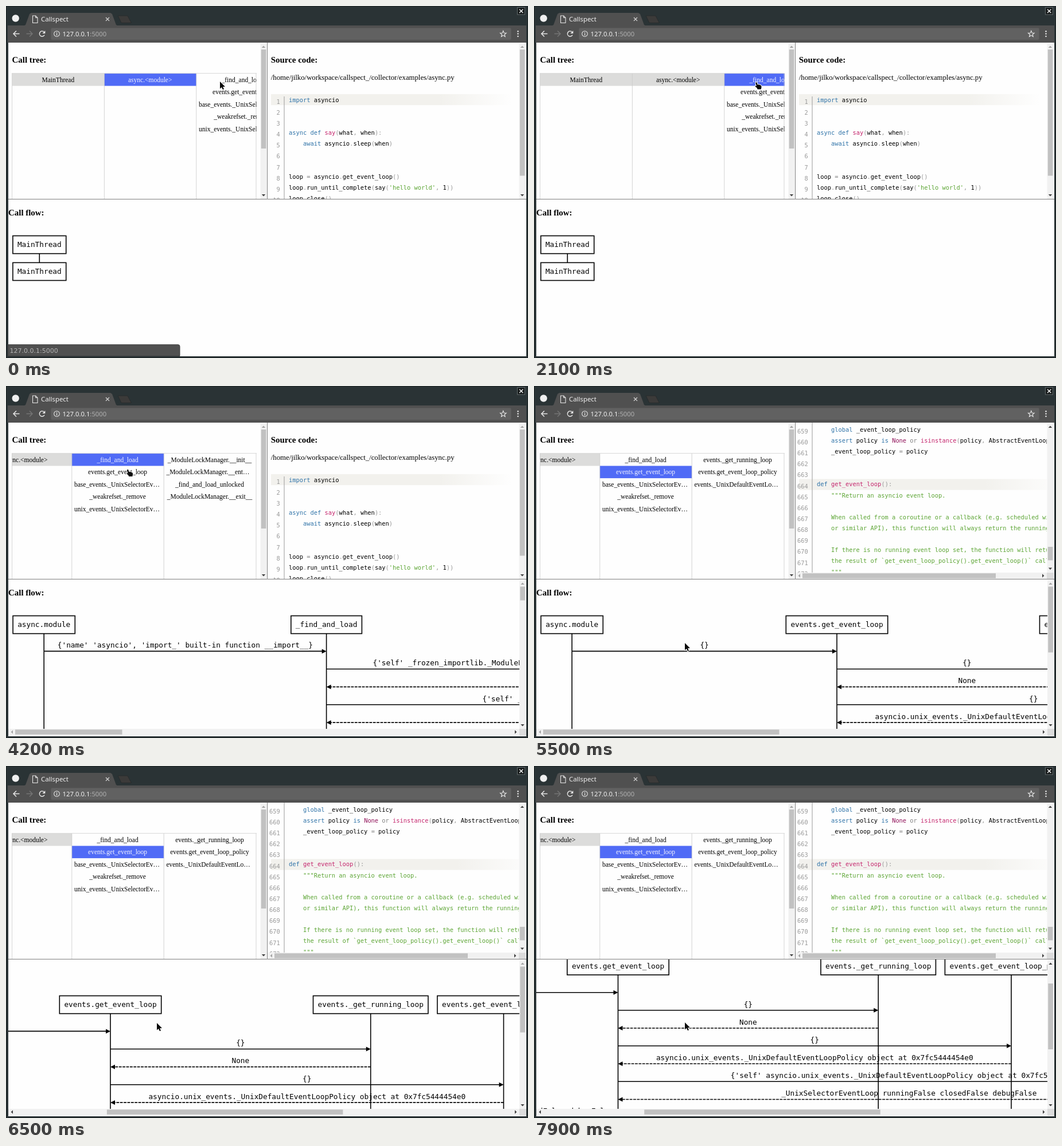
These frames come from a looping animation (910 px wide and 615 px high, 8 s). An HTML page with a canvas:

```html
<!DOCTYPE html>
<html lang="en">
<head>
<meta charset="utf-8">
<title>Callspect</title>
<style>
html, body { margin: 0; width: 100%; height: 100%; overflow: hidden; background: #2a3335; }
canvas { display: block; }
</style>
</head>
<body>
<canvas id="stage" width="910" height="615"></canvas>
<script>
const ctx = document.getElementById('stage').getContext('2d');
const LOOP = 8000, STEP = 100;
const SERIF = '"Liberation Serif", Times, serif';
const MONO = '"DejaVu Sans Mono", monospace';
const SANS = '"Noto Sans", "Open Sans", sans-serif';

// the page is shown at this zoom
const ZOOM = 0.798;
const font = (px, family, weight = '') => `${weight} ${px * ZOOM}px ${family}`;
const HEAD = font(18.72, SERIF, 'bold'), BODY = font(16, SERIF), CELL = font(14.4, SERIF);
const CODE = font(13, MONO), FLOW = font(16, MONO);
const CODE_W = 13 * 0.602 * ZOOM, FLOW_W = 16 * 0.602 * ZOOM, LINE_H = 24 * ZOOM;

// moments of the interaction
const HAND = 200, BUBBLE = 400, PICK_1 = 500, LOAD_1 = 2800, PICK_2 = 4400, LOAD_2 = 4700, ARROW = 4900;

const clamp = v => Math.max(0, Math.min(1, v));
const swing = p => 0.5 - Math.cos(Math.PI * clamp(p)) / 2;

// value at time t from [time, value] stops; a third entry asks for easing
function track(t, stops) {
  let [t0, v0] = stops[0];
  for (const [t1, v1, ease] of stops) {
    if (t < t1) {
      const p = clamp((t - t0) / (t1 - t0));
      return v0 + (v1 - v0) * (ease ? swing(p) : p);
    }
    t0 = t1; v0 = v1;
  }
  return v0;
}

function rect(x, y, w, h, fill) {
  ctx.fillStyle = fill;
  ctx.fillRect(x, y, w, h);
}

function text(s, x, y, face, fill = '#000', align = 'left') {
  ctx.font = face;
  ctx.fillStyle = fill;
  ctx.textAlign = align;
  ctx.fillText(s, x, y);
}

function path(points, fill, stroke, width = 1, close = true) {
  ctx.beginPath();
  points.forEach(([x, y]) => ctx.lineTo(x, y));
  if (close) ctx.closePath();
  if (fill) { ctx.fillStyle = fill; ctx.fill(); }
  if (stroke) { ctx.strokeStyle = stroke; ctx.lineWidth = width; ctx.stroke(); }
}

const line = (x0, y0, x1, y1, color, width = 1) => path([[x0, y0], [x1, y1]], null, color, width, false);

function circle(x, y, r, fill, stroke, width = 1) {
  ctx.beginPath();
  ctx.arc(x, y, r, 0, 7);
  if (fill) { ctx.fillStyle = fill; ctx.fill(); }
  if (stroke) { ctx.strokeStyle = stroke; ctx.lineWidth = width; ctx.stroke(); }
}

function panel(x, y, w, h, radius, fill, stroke) {
  ctx.beginPath();
  ctx.roundRect(x, y, w, h, radius);
  ctx.fillStyle = fill;
  ctx.fill();
  ctx.strokeStyle = stroke;
  ctx.lineWidth = 1;
  ctx.stroke();
}

function clipped(x, y, w, h, draw) {
  ctx.save();
  ctx.beginPath();
  ctx.rect(x, y, w, h);
  ctx.clip();
  draw();
  ctx.restore();
}

const arrowColor = on => on ? '#404040' : '#a3a3a3';

function vbar(x, top, bottom, from, to, up, down) {
  const c = x + 5.5;
  rect(x, top, 11, bottom - top, '#f1f1f1');
  rect(x + 1.3, from, 8.6, to - from, '#c1c1c1');
  path([[c - 3.2, top + 8], [c + 3.2, top + 8], [c, top + 4.6]], arrowColor(up));
  path([[c - 3.2, bottom - 8], [c + 3.2, bottom - 8], [c, bottom - 4.6]], arrowColor(down));
}

function hbar(y, left, right, from, to, back, fwd) {
  const c = y + 5.5;
  rect(left, y, right - left, 11, '#f1f1f1');
  rect(from, y + 1.3, to - from, 8.6, '#c1c1c1');
  path([[left + 8, c - 3.2], [left + 8, c + 3.2], [left + 4.6, c]], arrowColor(back));
  path([[right - 8, c - 3.2], [right - 8, c + 3.2], [right - 4.6, c]], arrowColor(fwd));
}

// ---------- browser window ----------
function drawChrome() {
  rect(0, 0, 910, 615, '#2a3335');
  ctx.strokeStyle = '#1b2223';
  ctx.lineWidth = 1;
  ctx.strokeRect(0.5, 0.5, 909, 614);

  rect(3, 34, 904, 30, '#505050');
  path([[31, 34.5], [34, 33], [41, 14], [44, 12], [182, 12], [185, 14], [192, 33], [195, 34.5]], '#505050');
  path([[195, 17], [212, 17], [218.5, 29.5], [201, 29.5]], '#3b3a39', '#262b2c');
  circle(16.7, 21.5, 6.2, '#f0f0f0');

  path([[46.5, 17], [51.5, 17], [55, 20.5], [55, 29.5], [46.5, 29.5]], null, '#e6e6e6', 1.1);
  path([[51.5, 17], [51.5, 20.5], [55, 20.5]], null, '#e6e6e6', 1, false);
  text('Callspect', 61, 27, '11.4px ' + SANS, '#f0f0f0');
  line(174, 20, 180, 26, '#d0d0d0', 1.3);
  line(180, 20, 174, 26, '#d0d0d0', 1.3);

  rect(891, 2, 14, 13.5, '#141818');
  ctx.strokeStyle = '#586062';
  ctx.strokeRect(891.5, 2.5, 13, 12.5);
  line(895, 5.7, 901.3, 12, '#f4f4f4', 1.5);
  line(901.3, 5.7, 895, 12, '#f4f4f4', 1.5);

  for (const [x, dir, color] of [[18, 1, '#e8e8e8'], [41, -1, '#757575']]) {
    line(x - 5 * dir, 48.5, x + 5.5 * dir, 48.5, color, 1.5);
    path([[x, 43.5], [x - 5 * dir, 48.5], [x, 53.5]], null, color, 1.5, false);
  }
  ctx.beginPath();
  ctx.arc(63, 48.5, 4.6, 0.5, 5.4);
  ctx.strokeStyle = '#e8e8e8';
  ctx.lineWidth = 1.5;
  ctx.stroke();
  path([[68.3, 43], [68.3, 48], [63.3, 48]], '#e8e8e8');

  panel(78.5, 38.5, 802, 20.5, 2, '#616161', '#5a5a5a');
  circle(88.5, 48.5, 4.8, null, '#e4e4e4', 1.1);
  rect(87.9, 47.6, 1.3, 3.8, '#e4e4e4');
  rect(87.9, 45.4, 1.3, 1.3, '#e4e4e4');
  const urlFont = '11.3px ' + SANS;
  text('127.0.0.1', 98.5, 52.6, urlFont, '#f2f2f2');
  text(':5000', 98.5 + ctx.measureText('127.0.0.1').width, 52.6, urlFont, '#b0b0b0');

  const star = [...Array(10).keys()].map(i => {
    const r = i % 2 ? 2.4 : 5.6, a = i * Math.PI / 5;
    return [866.8 + r * Math.sin(a), 49 - r * Math.cos(a)];
  });
  path(star, null, '#e8e8e8', 1.1);
  [44.2, 48.6, 53].forEach(y => circle(892.5, y, 1.25, '#e8e8e8'));
}

// ---------- call tree ----------
const COL = 201 * ZOOM, ROW = 27 * ZOOM, TOP = 118;
const CALLS = ['_find_and_load', 'events.get_event_loop', 'base_events._UnixSelectorEv…',
  '_weakrefset._remove', 'unix_events._UnixSelectorEv…'];
const LOAD_CALLS = ['_ModuleLockManager.__init__', '_ModuleLockManager.__ent…',
  '_find_and_load_unlocked', '_ModuleLockManager.__exit__'];
const LOOP_CALLS = ['events._get_running_loop', 'events.get_event_loop_policy', 'events._UnixDefaultEventLo…'];

function drawTree(t) {
  text('Call tree:', 10.5, 99, HEAD);
  const columns = [['MainThread'], ['async.<module>'], CALLS];
  if (t >= LOAD_1) columns.push(t >= LOAD_2 ? LOOP_CALLS : LOAD_CALLS);
  const active = t < PICK_1 ? [1, 0] : [2, t < PICK_2 ? 0 : 1];
  const shift = t < LOAD_1 ? 0 : 217 * swing((t - 2681) / 400);

  clipped(10, TOP - 1, 427, 220, () => {
    columns.forEach((rows, c) => {
      const x = 11 + c * COL - shift;
      rows.forEach((name, r) => {
        const y = TOP + r * ROW, on = c === active[0] && r === active[1];
        if (on) rect(x, y, COL, ROW, '#506bf6');
        else if (c < active[0] && c < 2) rect(x, y, COL, ROW, '#dcdcdb');
        const fill = on ? '#f4f5ff' : '#000';
        if (name.endsWith('…')) text(name, x + 4.2, y + 14.6, CELL, fill);
        else text(name, x + COL / 2 - 0.4, y + 14.6, CELL, fill, 'center');
      });
      if (c) line(x, TOP, x, 337, '#c8c8c8', ZOOM);
    });
    line(10, 117.7, 437, 117.7, '#cccccc', ZOOM);
    line(10.5, 118, 10.5, 337, '#cccccc', ZOOM);
    line(436, 118, 436, 337, '#cccccc', ZOOM);
  });
  vbar(443.5, 65, 337, 76, 249, false, true);
}

// ---------- source code ----------
// first letter of each piece: k keyword, f function, s string, p punctuation, o operator, b constant, n plain
const INK = { k: '#2f73a8', f: '#c4246c', s: '#5ca534', p: '#999999', o: '#808080', b: '#8f1058', n: '#000000' };
const SMALL = [
  ['kimport', 'n asyncio'], [], [],
  ['kasync def ', 'fsay', 'p(', 'nwhat', 'p,', 'n when', 'p):'],
  ['k    await', 'n asyncio', 'p.', 'nsleep', 'p(', 'nwhen', 'p)'], [], [],
  ['nloop ', 'o=', 'n asyncio', 'p.', 'nget_event_loop', 'p()'],
  ['nloop', 'p.', 'nrun_until_complete', 'p(', 'nsay', 'p(', "s'hello world'", 'p,', 'n 1', 'p))'],
  ['nloop', 'p.', 'nclose', 'p()']
];
const POLICY = [
  ['k    global', 'n _event_loop_policy'],
  ['k    assert', 'n policy ', 'kis', 'b None', 'o or', 'f isinstance', 'p(', 'npolicy', 'p,', 'n AbstractEventLoopPolicy', 'p)'],
  ['n    _event_loop_policy ', 'o=', 'n policy'], [], [],
  ['kdef', 'f get_event_loop', 'p():'],
  ['s    """Return an asyncio event loop.'], [],
  ['s    When called from a coroutine or a callback (e.g. scheduled with call_soon'],
  ['s    or similar API), this function will always return the running event loop.'], [],
  ['s    If there is no running event loop set, the function will return'],
  ['s    the result of `get_event_loop_policy().get_event_loop()` call.'],
  ['s    """']
];

function drawCode(lines, first, y) {
  lines.forEach((parts, i) => {
    const base = y + i * LINE_H;
    text(first + i, 477.8, base + 3.2, CODE, '#999999', 'right');
    let x = 493;
    for (const part of parts) {
      text(part.slice(1), x, base, CODE, INK[part[0]]);
      x += (part.length - 1) * CODE_W;
    }
  });
}

function highlight(y, right) {
  const g = ctx.createLinearGradient(462, 0, right, 0);
  g.addColorStop(0, '#f2f1ed');
  g.addColorStop(0.7, '#f2f1ed');
  g.addColorStop(1, '#fefefe');
  rect(462, y, right - 462, LINE_H, g);
}

function drawSource(t) {
  if (t < LOAD_2) {
    clipped(456, 64, 439, 273, () => {
      text('Source code:', 461.8, 99, HEAD);
      text('/home/jilko/workspace/callspect_/collector/examples/async.py', 461.8, 128.6, BODY);
      highlight(154, 882);
      line(485, 158, 485, 337, '#999999');
      drawCode(SMALL, 1, 167.5);
    });
    vbar(894.5, 65, 337, 76, 296.5, false, true);
    return;
  }
  clipped(456, 64, 438, 262, () => {
    highlight(162.5, 925);
    line(485, 64, 485, 326, '#999999');
    drawCode(POLICY, 659, 79.6);
  });
  vbar(894.5, 65, 325.5, 281, 304.5, true, true);
  hbar(326, 456, 894, 468, 805, false, true);
  rect(894, 326, 12, 11, '#dcdcdc');
}

// ---------- call flow ----------
const BLACK = '#000', STROKE = 2 * ZOOM, PITCH = 39 * ZOOM;

function actor(name, x, y = 401.5) {
  const w = name.length * FLOW_W + 20 * ZOOM;
  ctx.strokeStyle = BLACK;
  ctx.lineWidth = STROKE;
  ctx.strokeRect(x - w / 2, y, w, PITCH);
  text(name, x, y + 19.8, FLOW, BLACK, 'center');
}

const stem = x => line(x, 432.6, x, 900, BLACK, STROKE);

// n-th message; it is dashed when it runs back to the left
function message(n, from, to, label, labelX) {
  const y = 463.4 + n * PITCH, dir = Math.sign(to - from);
  if (dir < 0) ctx.setLineDash([6 * ZOOM, 2 * ZOOM]);
  line(from, y, to - dir * 5, y, BLACK, STROKE);
  ctx.setLineDash([]);
  path([[to, y], [to - dir * 8, y - 4], [to - dir * 8, y + 4]], BLACK);
  if (labelX) text(label, labelX, y - 6.2, FLOW);
  else text(label, (from + to) / 2, y - 6.2, FLOW, BLACK, 'center');
}

function flowStart() {
  const x = 58.3;
  actor('MainThread', x);
  actor('MainThread', x, 448.4);
  line(x, 432.6, x, 448.4, BLACK, STROKE);
}

function flowLoad() {
  const a = 66.2, b = 558.6, far = 1500;
  const self = "{'self' _frozen_importlib._ModuleLockManager object}";
  actor('async.module', a);
  actor('_find_and_load', b);
  stem(a);
  stem(b);
  message(0, a, b, "{'name' 'asyncio', 'import_' built-in function __import__}");
  message(1, b, far, self, 639.5);
  message(2, far, b, '');
  message(3, b, far, self, 830.5);
  message(4, far, b, '');
}

function flowLoop() {
  const a = 66.2, b = 528, c = 981.7, d = 1213.5, e = 1542.5;
  const policy = 'asyncio.unix_events._UnixDefaultEventLoopPolicy object at 0x7fc5444454e0';
  const result = '_UnixSelectorEventLoop runningFalse closedFalse debugFalse';
  actor('async.module', a);
  actor('events.get_event_loop', b);
  actor('events._get_running_loop', c);
  actor('events.get_event_loop_policy', d);
  [a, b, c, d].forEach(stem);
  message(0, a, b, '{}');
  message(1, b, c, '{}');
  message(2, c, b, 'None');
  message(3, b, d, '{}');
  message(4, d, b, policy);
  message(5, b, e, "{'self' " + policy + '}');
  message(6, e, b, result);
  message(7, b, a, result);
}

function drawFlow(t) {
  const sx = track(t, [[5700, 0], [6500, 346], [6700, 381.5, true]]);
  const sy = track(t, [[7600, 0], [7900, 67.7]]);
  const bars = t >= LOAD_1, loaded = t >= LOAD_2;
  clipped(4, 338, bars ? 891 : 903, bars ? 261 : 274, () => {
    ctx.translate(-sx, -sy);
    text('Call flow:', 4, 366, HEAD);
    (loaded ? flowLoop : bars ? flowLoad : flowStart)();
  });
  if (bars) {
    const x = 16 + sx * 0.462, y = 350.5 + sy * 0.436;
    vbar(895, 339, 599, y, y + (loaded ? 115 : 24), sy > 0, true);
    hbar(599, 4, 895, x, x + (loaded ? 411.5 : 186.5), sx > 0, true);
    rect(895, 599, 12, 12, '#dcdcdc');
  }
  if (t < BUBBLE) {
    panel(3.5, 591.7, 299.5, 19.8, [0, 3, 0, 0], '#505050', '#3f3f3f');
    text('127.0.0.1:5000', 6.5, 606, '11px "DejaVu Sans", sans-serif', '#b4b4b4');
  }
}

// ---------- pointer ----------
const ARROW_SHAPE = [[0, 0], [0, 12.6], [2.9, 10], [5, 14.2], [7, 13.2], [5, 9.2], [9, 9]];
const HAND_SHAPE = [[1, 0], [2.6, 0], [3.6, 4], [6, 3.8], [8, 4.4], [10, 5.6], [10.6, 8], [9.8, 12],
  [3.6, 12], [2.6, 9.6], [-0.6, 7], [0, 5.8], [2, 6.6], [0.2, 1]];

function drawPointer(t) {
  const x = track(t, [[100, 373], [400, 386, true], [3700, 386], [4300, 198, true], [4700, 198], [5300, 263, true]]);
  const y = track(t, [[100, 132], [400, 133.5, true], [3700, 133.5], [4300, 147, true], [4700, 147],
    [5300, 449, true], [7200, 449], [7300, 448]]);
  const hand = t >= HAND && t < ARROW;
  ctx.save();
  ctx.translate(x, y);
  ctx.lineJoin = 'round';
  const shape = hand ? HAND_SHAPE : ARROW_SHAPE;
  path(shape, null, '#ffffff', 2);
  path(shape, '#0a0a0a');
  ctx.restore();
}

function draw(t) {
  drawChrome();
  rect(4, 64, 903, 548, '#fefefe');
  drawTree(t);
  drawSource(t);
  line(455.5, 64, 455.5, 337, '#808080');
  line(4, 337.5, 907, 337.5, '#808080');
  drawFlow(t);
  drawPointer(t);
}

function tick() {
  const t = performance.now() % LOOP;
  draw(Math.floor(t / STEP) * STEP);
  requestAnimationFrame(tick);
}
tick();
</script>
</body>
</html>
```
